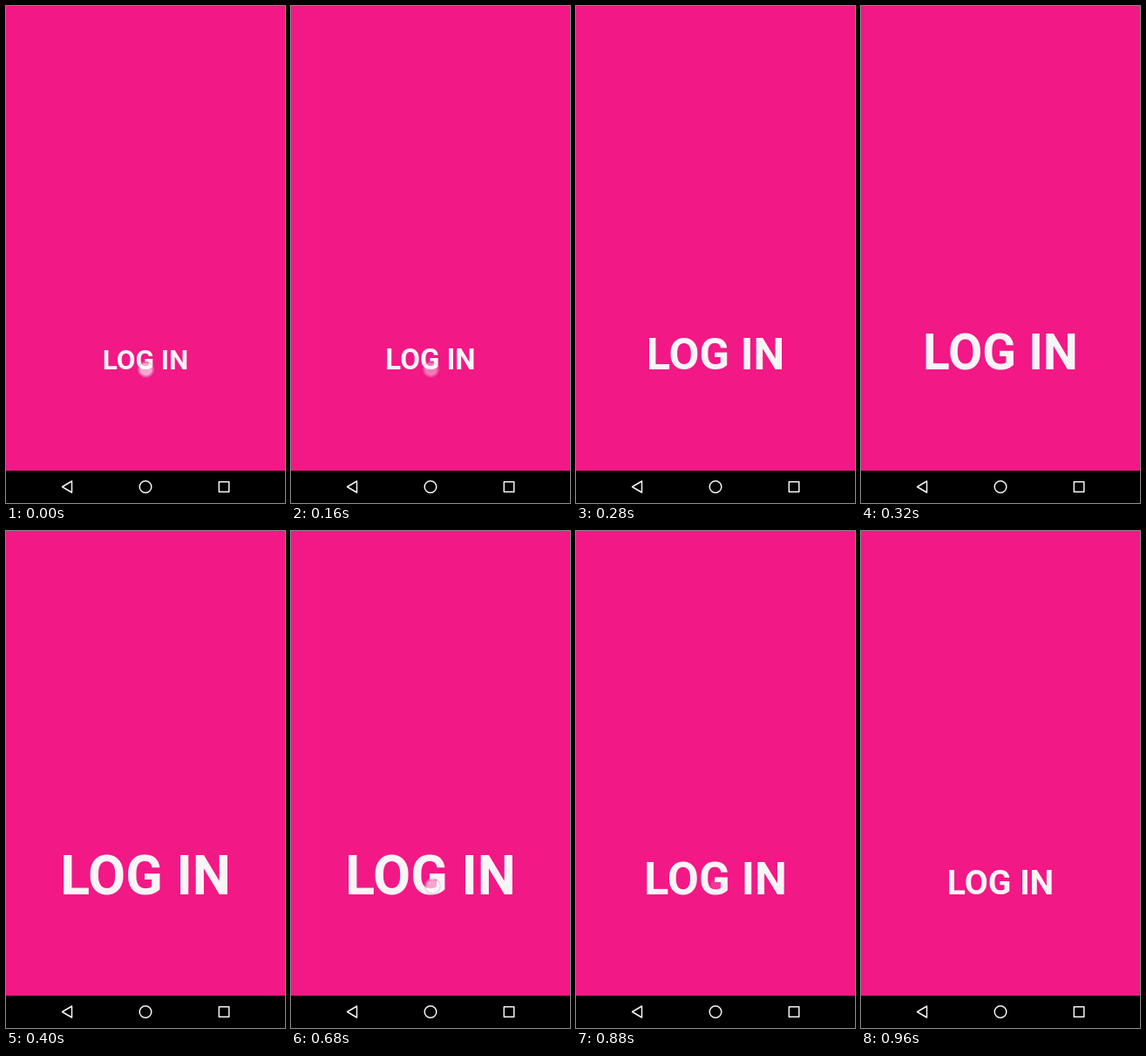
An HTML page that plays this animation: 320x569 px, repeating every 1000 ms.

```html
<!DOCTYPE html>
<html lang="en">
<head>
<meta charset="utf-8">
<title>Log in</title>
<style>
  html, body { margin: 0; width: 100%; height: 100%; overflow: hidden; background: #f21886; }
  svg { display: block; width: 100vw; height: 100vh; }
  text { font-family: Roboto, Arial, sans-serif; font-weight: 700; fill: #f7f5f6; text-anchor: middle; }
</style>
</head>
<body>
<svg viewBox="0 0 320 569">
  <rect width="320" height="569" fill="#f21886"/>
  <text id="label" x="160" y="415.7">LOG IN</text>
  <g id="touch">
    <circle r="9.3" fill="#fff" fill-opacity=".34"/>
    <circle r="7.2" fill="#fff" fill-opacity=".42"/>
    <circle r="8.7" fill="none" stroke="#855c74" stroke-opacity=".32" stroke-width="1"/>
  </g>
  <rect y="532" width="320" height="37"/>
  <g fill="none" stroke="#f4f4f4" stroke-width="1.5" stroke-linejoin="round">
    <path d="M64.5 550.5 L75.5 544 V557 Z"/>
    <circle cx="160" cy="550.5" r="6.8"/>
    <rect x="244.3" y="544.8" width="11.5" height="11.5"/>
  </g>
</svg>
<script>
  const LOOP = 1000, STEP = 40;
  const SMALL = 31.5, LARGE = 62.5;
  const label = document.getElementById('label');
  const touch = document.getElementById('touch');

  // Each tap: when it lands, when it lifts, when it has faded, and where.
  const taps = [
    { down: 0, up: 110, gone: 260, x: 160.5, y: 416 },
    { down: 680, up: 770, gone: 910, x: 162.5, y: 406.5 }
  ];

  const progress = (t, from, to) => Math.min(1, Math.max(0, (t - from) / (to - from)));
  const ease = p => (1 - Math.cos(Math.PI * p)) / 2;

  function draw(time) {
    const t = Math.floor((time % LOOP) / STEP) * STEP;
    const size = ease(progress(t, 120, 398)) - ease(progress(t, 771, 1053));
    label.setAttribute('font-size', SMALL + (LARGE - SMALL) * size);

    const tap = taps.find(p => t >= p.down && t < p.gone);
    touch.setAttribute('opacity', tap ? 1 - progress(t, tap.up, tap.gone) : 0);
    if (tap) touch.setAttribute('transform', `translate(${tap.x} ${tap.y})`);
  }

  const start = performance.now();
  function tick() {
    draw(performance.now() - start);
    requestAnimationFrame(tick);
  }
  tick();
</script>
</body>
</html>
```
